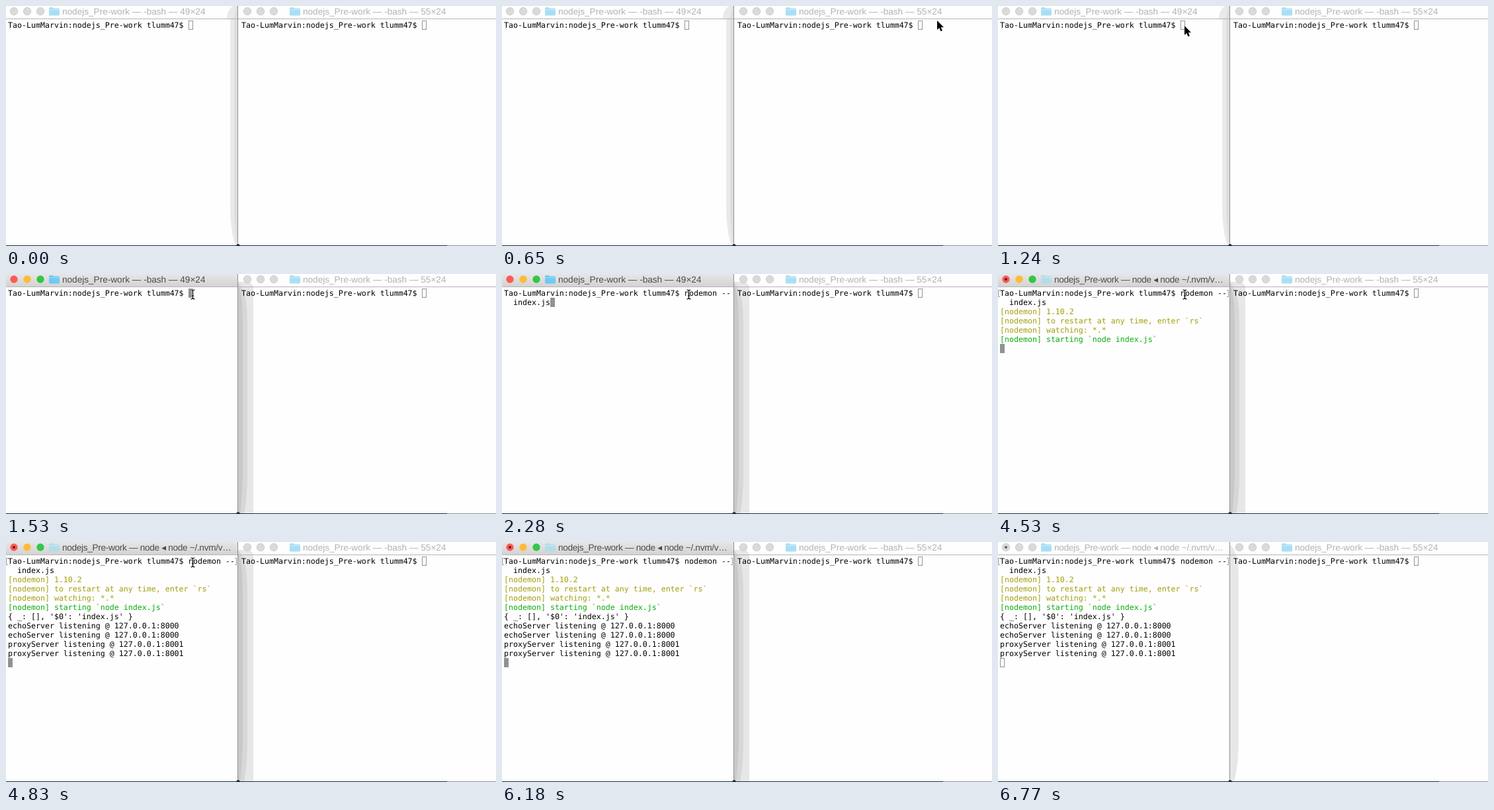
An HTML page that plays this animation: 741 by 364 pixels, repeating every 8000 ms.

```html
<!DOCTYPE html>
<html lang="en">
<head>
<meta charset="utf-8">
<title>Two terminals</title>
<style>
  html, body { margin: 0; width: 100%; height: 100%; overflow: hidden; background: #fefefe; }
  svg { display: block; width: 741px; height: 364px; }
  text { white-space: pre; text-rendering: geometricPrecision; }
  .mono { font: 11.627px "DejaVu Sans Mono", monospace; }
  .title { font: 13.6px "Liberation Sans", "DejaVu Sans", sans-serif; fill: #b3b3b3; }
  .tight { letter-spacing: -.3px; }
  .light { fill: #dadada; stroke: #cecece; }
  .folder { color: #a9dff5; }
  .on .title { fill: #4b4b4b; }
  .on .light { stroke: none; }
  .on .light:nth-of-type(1) { fill: #fc5b57; }
  .on .light:nth-of-type(2) { fill: #fdbc36; }
  .on .light:nth-of-type(3) { fill: #32c748; }
  .on .folder { color: #6fcaf1; }
  .on.busy .folder { color: #b4dcea; }
  .dot { fill: #606060; }
  .on .dot { fill: #6d0f0c; }
</style>
</head>
<body>
<svg viewBox="0 0 741 364">
  <defs>
    <linearGradient id="bar" x2="0" y2="1">
      <stop stop-color="#e6e6e6"/><stop offset="1" stop-color="#d3d3d3"/>
    </linearGradient>
    <g id="folderIcon">
      <path d="M0 3.5Q0 2 1.500 2H5.500L7 3.500H14.500Q16 3.500 16 5V13Q16 14.500 14.500 14.500H1.500Q0 14.500 0 13Z" fill="currentColor"/>
      <path d="M0 5.500H16" stroke="#fff" stroke-opacity=".35"/>
    </g>
  </defs>

  <rect width="741" height="364" fill="#fefefe"/>
  <rect id="activeBar" width="351" height="19" fill="url(#bar)"/>

  <g id="restShadow">
    <path d="M343 0Q334 7 334 19H339V310Q340 345 347 363H351V0Z" fill="#e9e9e9"/>
    <path d="M349 0Q345 8 345 24V315Q346 345 350 363H351V0Z" fill="#dedede"/>
  </g>
  <g id="activeShadow">
    <path d="M351 12H366Q373 14 374 20V363H351Z" fill="#e7e7e7"/>
    <path d="M351 12Q365 26 365 75V310Q364 345 360 363H351Z" fill="#d7d7d7"/>
    <path d="M351 15Q358 32 358 85V300Q357 340 354 363H351Z" fill="#c8c8c8"/>
  </g>
  <path id="leftShadow" d="M351 4Q364 14 364 60V300Q363 345 357 363H351Z" fill="#e7e7e7"/>

  <path d="M0 19.500H741" stroke="#b4b4b4"/>
  <path d="M350.500 0V363" stroke="#8f8f8f"/>
  <path d="M0 363.500H667" stroke="#1e2836"/>
  <path d="M667 363.500H741" stroke="#8d9096"/>
  <path d="M347 364L350 361H352L355 364Z" fill="#252c36"/>

  <g id="wins"></g>
  <g id="rows" class="mono"></g>
  <path id="marks" d="M3 24.500H.5V34.500H3M346 24.500H348.500V34.500H346" fill="none" stroke="#999"/>
  <rect id="caret" width="6" height="13"/>
  <rect x="629.5" y="22.5" width="6" height="13" fill="none" stroke="#929292"/>

  <path id="arrow" d="M1 1V15L4.200 12L6.400 17.200L8.900 16.200L6.700 11.200H11Z" stroke="#fff" paint-order="stroke"/>
  <g id="beam" fill="none">
    <path d="M-3 -7Q0 -7 0 -5Q0 -7 3 -7M0 -5V5M-3 7Q0 7 0 5Q0 7 3 7M-1.500 2H1.500" stroke="#fff" stroke-width="2.600"/>
    <path d="M-3 -7Q0 -7 0 -5Q0 -7 3 -7M0 -5V5M-3 7Q0 7 0 5Q0 7 3 7M-1.500 2H1.500" stroke="#000" stroke-width="1.200"/>
  </g>
</svg>
<script>
const LOOP = 8000, FOCUS = 1530, RUN = 4380, BLUR = 6770;
const CELL = 7, LINE = 14, LEFT = 3, TOP = 22;
const YELLOW = '#a39f0c', GREEN = '#0aac0c';
const $ = id => document.getElementById(id);
const prompt = 'Tao-LumMarvin:nodejs_Pre-work tlumm47$ ';

// start, row, text, colour, column
const output = [
  [0, 0, prompt],
  [2280, 0, 'nodemon --', '#000', prompt.length],
  [2280, 1, '  index.js'],
  [4530, 2, '[nodemon] 1.10.2', YELLOW],
  [4530, 3, '[nodemon] to restart at any time, enter `rs`', YELLOW],
  [4530, 4, '[nodemon] watching: *.*', YELLOW],
  [4530, 5, '[nodemon] starting `node index.js`', GREEN],
  [4830, 6, "{ _: [], '$0': 'index.js' }"],
  [4830, 7, 'echoServer listening @ 127.0.0.1:8000'],
  [4830, 8, 'echoServer listening @ 127.0.0.1:8000'],
  [4830, 9, 'proxyServer listening @ 127.0.0.1:8001'],
  [4830, 10, 'proxyServer listening @ 127.0.0.1:8001']
];

// start, column, row
const carets = [[0, prompt.length, 0], [2280, 10, 1], [RUN, 0, 2], [4530, 0, 6], [4830, 0, 11]];

const titles = [
  [0, '-bash — 49×24'],
  [RUN, 'node ~/.nvm/versions…'],
  [4530, 'node ◂ node ~/.nvm/v…']
];

// start, shape, x, y
const pointers = [
  [0, ''],
  [500, 'arrow', 680, 12], [650, 'arrow', 657, 21], [790, 'arrow', 419, 66],
  [940, 'arrow', 312, 47], [1090, 'arrow', 284, 32], [1240, 'arrow', 281, 29],
  [FOCUS, 'beam', 282.5, 31], [5730, 'beam', 342.5, 28.5],
  [5880, 'arrow', 564, 19], [6030, 'arrow', 660, 25],
  [6180, '']
];

const at = (table, t) => table.findLast(step => step[0] <= t);
const show = (el, on) => el.style.visibility = on ? 'visible' : 'hidden';
const move = (el, x, y) => el.setAttribute('transform', `translate(${x} ${y})`);

const header = (id, x, name) => `<g id="${id}" transform="translate(${x})">
  ${[12, 32, 52].map(cx => `<circle class="light" cx="${cx}" cy="8" r="5.700"/>`).join('')}
  <use class="folder" href="#folderIcon" x="${x ? 76 : 65}"/>
  <text class="title" x="${x ? 96 : 85}" y="13">nodejs_Pre-work — ${name}</text></g>`;

$('wins').innerHTML = header('left', 0, titles[0][1]) + header('right', 353, '-bash — 55×24')
  + '<circle id="dot" class="dot" cx="12" cy="8" r="2"/>';

function addRow(row, text, colour = '#000', col = 0, x = LEFT) {
  const el = document.createElementNS('http://www.w3.org/2000/svg', 'text');
  el.setAttribute('x', x + col * CELL);
  el.setAttribute('y', TOP + 11 + row * LINE);
  el.setAttribute('fill', colour);
  el.textContent = text;
  return $('rows').appendChild(el);
}
const lines = output.map(([start, ...row]) => [start, addRow(...row)]);
addRow(0, prompt, '#000', 0, 356);

const title = $('left').querySelector('text');

function draw(t) {
  const active = t >= FOCUS && t < BLUR, busy = t >= RUN;
  $('left').setAttribute('class', (active ? 'on' : '') + (busy ? ' busy' : ''));
  $('dot').style.fill = active ? '#6d0f0c' : '#606060';
  show($('dot'), busy);
  show($('marks'), busy);
  show($('activeBar'), active);
  show($('activeShadow'), active);
  show($('restShadow'), t < FOCUS);
  show($('leftShadow'), t >= BLUR);

  const name = 'nodejs_Pre-work — ' + at(titles, t)[1];
  if (title.textContent !== name) title.textContent = name;
  title.classList.toggle('tight', busy);
  for (const [start, el] of lines) show(el, t >= start);

  const [, col, row] = at(carets, t);
  move($('caret'), LEFT + col * CELL + .5, TOP + row * LINE + .5);
  $('caret').setAttribute('fill', active ? '#929292' : 'none');
  $('caret').setAttribute('stroke', '#929292');

  const [, shape, x, y] = at(pointers, t);
  for (const id of ['arrow', 'beam']) {
    show($(id), id === shape);
    if (id === shape) move($(id), x, y);
  }
}

function tick() {
  draw(performance.now() % LOOP);
  requestAnimationFrame(tick);
}
tick();
</script>
</body>
</html>
```
